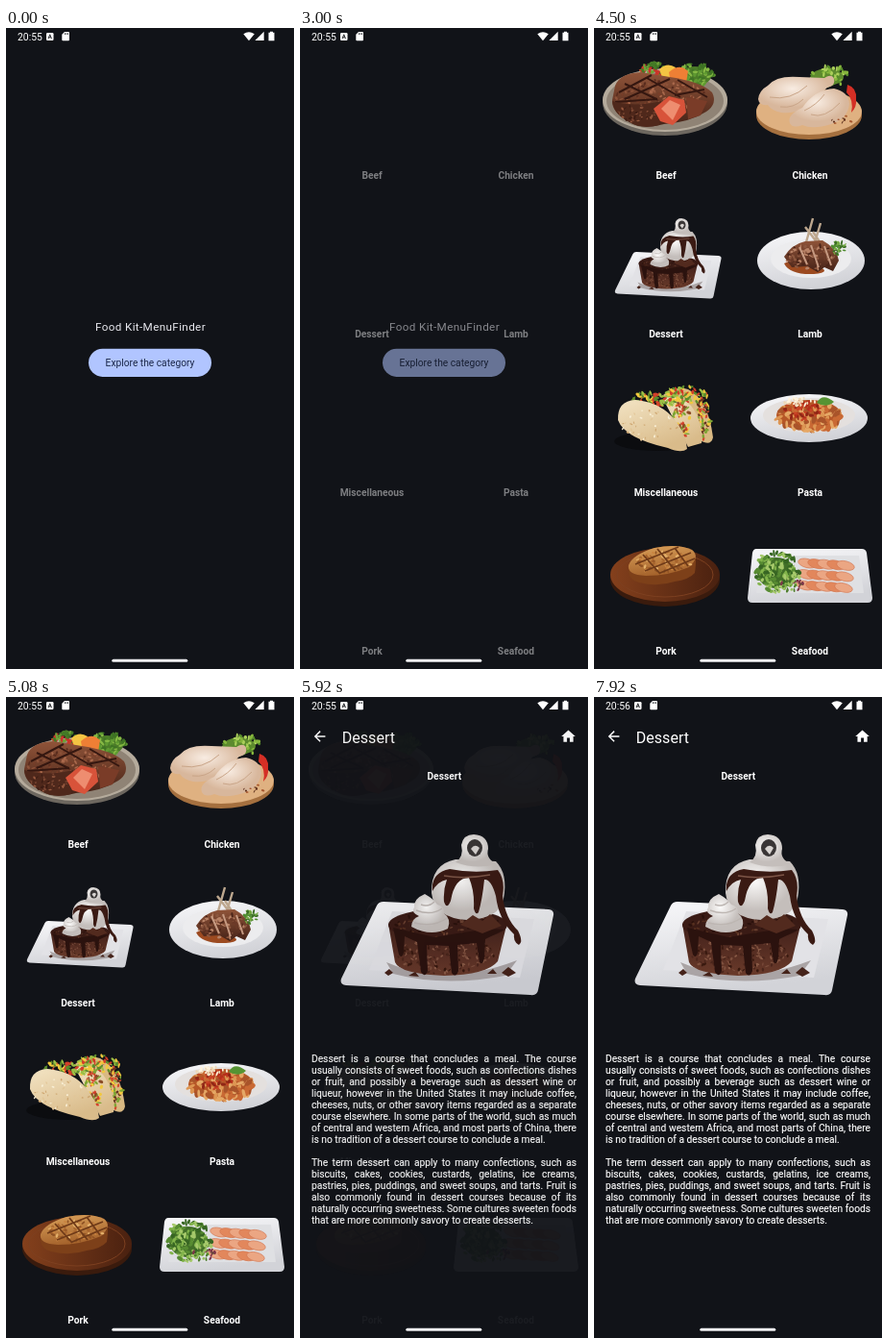
An HTML page for the animation above (8000 ms loop, 300x667 px).

```html
<!DOCTYPE html>
<html lang="en">
<head>
<meta charset="utf-8">
<title>Recipe browser</title>
<style>
  html, body { margin: 0; width: 100%; height: 100%; overflow: hidden; background: #111318; }
  body { position: relative; font-family: Roboto, sans-serif; color: #fff; }
  svg, .screen { position: absolute; left: 0; top: 0; width: 300px; height: 667px; }
  text { font: 10.22px Roboto, sans-serif; fill: #fff; }
  .mid { text-anchor: middle; }
  .bold { font-weight: 700; }
  .title { font-size: 11.68px; letter-spacing: .365px; fill: #e8e8ee; }
  .bar { font-size: 16.06px; }
  .clock { font-size: 10.4px; }
  .copy { position: absolute; left: 12px; top: 371px; width: 276px; font-size: 10.22px; line-height: 11.98px; -webkit-text-stroke: .15px #fff; }
  .copy p { margin: 0 0 11.98px; white-space: pre-line; text-align: justify; text-align-last: justify; }
  .copy span { display: block; white-space: nowrap; text-align-last: left; }

  .screen { animation: 8s cubic-bezier(.4, 0, .2, 1) infinite; }
  .home { animation-name: home; }
  .list { animation-name: list; }
  .detail { animation-name: detail; }
  .photos { animation: photos 8s step-end infinite; }
  .before { animation: before 8s step-end infinite; }
  .after { animation: after 8s step-end infinite; }
  @keyframes home { 0%, 34.6% { opacity: 1 } 43.35%, 100% { opacity: 0 } }
  @keyframes list { 0%, 34.6% { opacity: 0 } 43.35%, 67.5% { opacity: 1 } 76.25%, 100% { opacity: 0 } }
  @keyframes detail { 0%, 67.5% { opacity: 0 } 76.25%, 100% { opacity: 1 } }
  @keyframes photos { 0% { opacity: 0 } 44.75%, 100% { opacity: 1 } }
  @keyframes before { 0% { opacity: 1 } 88.75%, 100% { opacity: 0 } }
  @keyframes after { 0% { opacity: 0 } 88.75%, 100% { opacity: 1 } }
</style>
</head>
<body>

<svg width="300" height="667">
  <defs>
    <linearGradient id="china" x2=".3" y2="1"><stop stop-color="#f8f8fa"/><stop offset="1" stop-color="#d2d3d8"/></linearGradient>
    <linearGradient id="steak" y2="1" x2="0"><stop stop-color="#905439"/><stop offset="1" stop-color="#452217"/></linearGradient>
    <linearGradient id="chop" y2="1" x2=".3"><stop stop-color="#dca35c"/><stop offset="1" stop-color="#a5632c"/></linearGradient>
    <linearGradient id="wood" x2="1"><stop stop-color="#84401c"/><stop offset="1" stop-color="#4a2110"/></linearGradient>
    <linearGradient id="cake" y2="1" x2="0"><stop stop-color="#40201a"/><stop offset="1" stop-color="#6a3a2a"/></linearGradient>
    <radialGradient id="cream" cx=".4" cy=".35"><stop stop-color="#fcfbfa"/><stop offset="1" stop-color="#c4bebb"/></radialGradient>
    <radialGradient id="skin" cx=".45" cy=".35"><stop stop-color="#f8ece2"/><stop offset="1" stop-color="#d8b79c"/></radialGradient>
    <linearGradient id="shell" x2=".5" y2="1"><stop stop-color="#f3e4c4"/><stop offset="1" stop-color="#d9bb8a"/></linearGradient>

    <g id="dessert">
      <path d="M87 213L259 221Q265 222 264 227L248 305Q247 311 240 310L48 300Q41 299 43 293L80 217Q82 213 87 213Z" fill="url(#china)"/>
      <path d="M96 223L244 231L229 292L72 284Z" fill="#e2e2e6"/>
      <path d="M90 276Q150 303 226 274L214 290Q150 302 97 288Z" fill="#aaa4a5"/>
      <path d="M92 236L99 276Q104 288 150 290Q195 289 206 275L215 238Z" fill="url(#cake)"/>
      <g data-spray="152 268 50 20 190 2.4 #7d4f3d #4b261c #8a5b47 #38190f"/>
      <ellipse cx="154" cy="237" rx="62" ry="17" fill="#3a1b15"/>
      <g data-spray="154 237 56 13 70 2.5 #57301f #2a110c #6a4030"/>
      <path d="M137 204Q136 174 162 169L204 171Q217 184 212 210Q208 231 174 232Q140 230 137 204Z" fill="url(#cream)"/>
      <path d="M162 172Q171 166 168 154Q170 143 181 143Q196 144 196 158Q193 168 205 174Q183 180 162 172Z" fill="url(#cream)"/>
      <ellipse cx="182" cy="157" rx="8" ry="9" fill="#3a3636"/>
      <path d="M178 158Q182 152 187 157L183 164Z" fill="#d8d4d1"/>
      <path d="M138 202Q136 183 156 179Q181 184 206 180Q214 190 211 207Q214 231 227 243Q233 255 228 258Q222 255 223 247Q207 232 204 207Q199 189 192 190Q190 210 186 224Q183 228 181 220Q182 202 176 188Q161 188 157 212Q153 222 150 213Q149 201 153 190Q143 192 138 202Z" fill="#3a1a13"/>
      <path d="M97 240L103 268Q106 273 108 266L109 249L122 255L126 286Q130 293 133 285L132 258L155 259L158 287Q162 293 165 285L164 258L184 256L187 276Q191 280 192 270L193 252L213 242Q200 240 170 245L140 250Z" fill="#2b120e"/>
      <path d="M167 237L180 227L190 233L198 226L210 238L190 246Z" fill="#522a1e"/>
      <path d="M150 186Q172 190 198 185" fill="none" stroke="#7d5547" stroke-width="1.6"/>
      <path d="M116 239Q116 231 124 228Q115 224 119 219Q118 210 130 205Q139 210 143 216Q151 218 150 225Q158 231 154 241Q136 250 116 239Z" fill="url(#cream)"/>
      <path d="M121 222Q137 228 148 220M119 235Q140 240 153 230M126 216Q134 219 140 213" fill="none" stroke="#bdb6b2" stroke-width="1.5"/>
      <path d="M88 287L93 283L97 287L92 290ZM113 290L120 286L124 291ZM195 288L201 283L205 288ZM210 287L217 281L225 287L217 291Z" fill="#45231a"/>
    </g>
  </defs>
</svg>

<svg class="screen home">
  <text class="mid title" x="150.5" y="314.5">Food Kit-MenuFinder</text>
  <rect x="86" y="333.7" width="128" height="29.2" rx="14.6" fill="#b1c5ff"/>
  <text class="mid" x="150" y="352" style="fill:#1b2748">Explore the category</text>
</svg>

<svg class="screen list">
  <g class="photos">
    <g id="beef">
      <ellipse cx="74" cy="78" rx="65" ry="34" fill="#6d675f"/>
      <ellipse cx="74" cy="75" rx="65" ry="33" fill="#b5ab9c"/>
      <ellipse cx="74" cy="76" rx="61" ry="30" fill="#8f8375"/>
      <ellipse cx="105" cy="50" rx="17" ry="10" fill="#4c7c29"/>
      <g data-spray="105 49 19 12 65 3.6 #5f9a32 #86b944 #3f7424"/>
      <g data-spray="62 43 13 7 30 3.8 #6fa338 #c9352a #447a26"/>
      <path d="M68 43Q76 35 85 41L82 52L72 54Z" fill="#f4c443"/>
      <path d="M78 46Q89 36 98 45L96 57L80 58Z" fill="#ee7f35"/>
      <path d="M22 60Q27 47 49 46L79 51Q112 56 123 67Q129 79 117 87Q100 98 73 100Q50 106 37 98Q18 88 19 75Z" fill="url(#steak)"/>
      <g data-spray="70 74 48 20 150 2.4 #a9684b #793e29 #5a2c1e #8c5138"/>
      <path d="M26 67L60 49M32 74L79 53M22 77L66 74M84 70L115 64M32 58L65 74M55 52L90 72M87 54L118 72" stroke="#351710" stroke-width="2"/>
      <path d="M19 76Q42 83 70 76L68 101Q50 106 37 98Q20 89 19 76Z" fill="#4f281b"/>
      <g data-spray="44 89 20 9 40 2 #7a4632 #97593f #3c1c13"/>
      <path d="M62 84L78 71L94 75L96 88L82 101L69 97Z" fill="#d8533a"/>
      <path d="M96 72L118 76L111 91L98 95Z" fill="#7a3c28"/>
      <path d="M70 84L79 75L90 80L82 96Z" fill="#ee8d70"/>
    </g>

    <g id="chicken">
      <ellipse cx="224" cy="91" rx="55" ry="25" fill="#a5703f"/>
      <ellipse cx="224" cy="87" rx="55" ry="24" fill="#dfb181"/>
      <ellipse cx="243" cy="51" rx="17" ry="9" fill="#5d8a2e"/>
      <g data-spray="244 50 20 11 65 3.4 #86b63d #568b2a #abd05b"/>
      <path d="M264 59Q274 62 273 74Q274 82 268 88Q271 75 263 67Z" fill="#d42f25"/>
      <path d="M171 74Q172 65 181 60Q190 49 214 51L240 52Q248 47 250 53Q252 60 243 62L230 74Q217 90 195 88Q185 86 181 80Q172 81 171 74Z" fill="url(#skin)"/>
      <path d="M204 99Q201 90 217 83Q230 64 250 63Q265 66 266 79Q264 95 247 100Q228 106 217 101Q207 105 204 99Z" fill="url(#skin)"/>
      <path d="M183 72Q205 76 222 60M194 82Q208 84 218 74M226 90Q240 95 256 78M219 86Q232 80 240 69" stroke="#c9a588" fill="none"/>
      <g data-spray="258 95 11 6 10 2 #5b2f1d #a4542c"/>
    </g>

    <use href="#dessert" transform="translate(.5 126.5) scale(.5)"/>

    <g id="lamb">
      <ellipse cx="226" cy="242" rx="56" ry="30" fill="url(#china)"/>
      <ellipse cx="226" cy="240" rx="42" ry="20" fill="#ececee"/>
      <path d="M198 245Q210 238 231 247Q250 254 229 256Q204 257 198 245Z" fill="#9c4a20"/>
      <path d="M236 228L220 207M219 230L228 198M228 230L236 203M240 230L228 212" stroke="#bda78e" stroke-width="2.4"/>
      <path d="M198 238Q206 225 220 222L238 221Q253 229 255 242L249 253L240 249L233 254L222 248L206 249Z" fill="url(#steak)"/>
      <g data-spray="226 238 26 13 90 2.8 #b88266 #6b3a28 #8c573f #4b2519"/>
      <path d="M214 228L222 246M226 226L234 249M240 227L247 247" stroke="#c69a82" stroke-width="2"/>
      <g data-spray="255 229 7 7 30 2.8 #4f8c31 #76ab44 #3c6c27"/>
    </g>

    <g id="tacos">
      <ellipse cx="66" cy="430" rx="45" ry="10" fill="#0b0c0f"/>
      <path d="M72 382Q84 372 98 376Q119 386 124 426Q122 435 112 430Z" fill="#d9b983"/>
      <g data-spray="96 382 22 9 70 3.2 #9cbf45 #f1c83e #cf3d28 #5d8c2c"/>
      <g data-spray="114 406 7 22 55 3 #65351f #f1c83e #7da534 #d24b2e"/>
      <path d="M72 386Q88 380 101 393Q114 410 112 432L98 436Z" fill="url(#shell)"/>
      <g data-spray="65 386 24 8 75 3.2 #9cbf45 #f1c83e #d3402a #5d8c2c"/>
      <g data-spray="91 408 9 22 65 3 #8b4c27 #f1c83e #7da534 #d3402a"/>
      <path d="M25 408Q24 388 43 387Q66 389 80 403Q96 420 97 438Q91 443 77 437Q32 427 25 408Z" fill="url(#shell)"/>
      <g data-spray="58 413 29 17 40 1.8 #cfa873 #e2c698 #f9efd6"/>
    </g>

    <g id="pasta">
      <ellipse cx="224" cy="406" rx="61" ry="25" fill="url(#china)"/>
      <ellipse cx="224" cy="403" rx="48" ry="18" fill="#e4e0de"/>
      <ellipse cx="224" cy="403" rx="34" ry="16" fill="#b65727"/>
      <g data-spray="224 404 34 15 90 5.5 #dd9653 #c96934 #a9542a #e5a866"/>
      <g data-spray="217 398 20 10 60 3.2 #b72f1c #c94526 #912616"/>
      <g data-spray="214 389 16 4 34 2.6 #fff3dd #efd9b6"/>
      <path d="M232 390Q238 379 250 389Q242 396 232 390Z" fill="#569333"/>
    </g>

    <g id="pork">
      <ellipse cx="74" cy="574" rx="57" ry="28" fill="#3a1b0d"/>
      <ellipse cx="74" cy="569" rx="57" ry="28" fill="url(#wood)"/>
      <ellipse cx="74" cy="569" rx="50" ry="23" fill="none" stroke="#7d4020"/>
      <path d="M36 562Q37 549 63 541Q87 536 102 543Q108 548 105 567Q99 574 84 576Q66 582 47 577Q35 574 36 562Z" fill="#7d4019"/>
      <path d="M36 559Q40 548 63 541Q87 536 102 543Q111 550 99 561Q78 570 54 570Q34 569 36 559Z" fill="url(#chop)"/>
      <g data-spray="70 556 31 12 80 2.6 #e4b06a #a7642d #c98440 #8f5224"/>
      <path d="M43 558L88 540M53 565L101 546M69 567L105 552M51 548L69 568M66 542L85 565M84 541L98 560" stroke="#6f3a18" stroke-width="1.8"/>
    </g>

    <g id="seafood">
      <path d="M169 542H279Q283 542 284 546L290 593Q290 598 285 598H165Q160 598 160 593L165 546Q166 542 169 542Z" fill="url(#china)"/>
      <path d="M174 549H276L281 588H169Z" fill="#dfe0e3"/>
      <g id="salmon"></g>
      <ellipse cx="190" cy="567" rx="20" ry="16" fill="#426f28"/>
      <g data-spray="190 566 24 21 120 4 #578b32 #82b44b #376623 #a6c96b"/>
      <g data-spray="206 579 12 8 26 3 #4f7d2e #7c3548 #98bf5c"/>
    </g>
  </g>
  <g id="labels"></g>
</svg>

<div class="screen detail">
  <svg>
    <path d="M20 11H7.83l5.59-5.59L12 4l-8 8 8 8 1.41-1.41L7.83 13H20z" transform="translate(11.8 32.2) scale(.73)" fill="#fff"/>
    <path d="M10 20v-6h4v6h5v-8h3L12 3 2 12h3v8z" transform="translate(270.8 32.2) scale(.73)" fill="#fff"/>
    <text class="bar" x="43.8" y="48">Dessert</text>
    <text class="mid bold" x="150.3" y="85.5">Dessert</text>
    <use href="#dessert"/>
  </svg>
  <div class="copy">
    <p>Dessert is a course that concludes a meal. The course
usually consists of sweet foods, such as confections dishes
or fruit, and possibly a beverage such as dessert wine or
liqueur, however in the United States it may include coffee,
cheeses, nuts, or other savory items regarded as a separate
course elsewhere. In some parts of the world, such as much
of central and western Africa, and most parts of China, there
<span>is no tradition of a dessert course to conclude a meal.</span></p>
    <p>The term dessert can apply to many confections, such as
biscuits, cakes, cookies, custards, gelatins, ice creams,
pastries, pies, puddings, and sweet soups, and tarts. Fruit is
also commonly found in dessert courses because of its
naturally occurring sweetness. Some cultures sweeten foods
<span>that are more commonly savory to create desserts.</span></p>
  </div>
</div>

<svg fill="#fff">
  <text class="clock before" x="12" y="12.5">20:55</text>
  <text class="clock after" x="12" y="12.5">20:56</text>
  <rect x="42" y="5" width="7.5" height="8" rx="1.2"/>
  <path d="M44 11.2L45.75 6.8L47.5 11.2M44.7 9.8H46.8" fill="none" stroke="#111318" stroke-width=".9"/>
  <path d="M61 4H65Q66 4 66 5V12.2Q66 13.2 65 13.2H59.3Q58.3 13.2 58.3 12.2V6.8Z"/>
  <path d="M61.4 5.2V7M63 5.2V7M64.6 5.2V7" stroke="#111318" stroke-width=".7"/>
  <path d="M247.3 6.3Q253 2 258.8 6.3L253 13.2Z"/>
  <path d="M268.7 3.8V13H259.4Z"/>
  <path d="M275 3.8H278V4.8H279.5V13.2H273.5V4.8H275Z"/>
  <rect x="110.3" y="656.8" width="79" height="3" rx="1.5" fill="#f0f0f2"/>
</svg>

<script>
  const NS = 'http://www.w3.org/2000/svg';
  const add = (parent, tag, attrs) => {
    const node = parent.appendChild(document.createElementNS(NS, tag));
    for (const key in attrs) node.setAttribute(key, attrs[key]);
    return node;
  };

  let seed = 7;
  const random = () => (seed = seed * 16807 % 2147483647) / 2147483647;

  // Fills an ellipse with small tilted flecks: cx cy rx ry count size colours...
  for (const group of document.querySelectorAll('[data-spray]')) {
    const [cx, cy, rx, ry, count, size, ...colors] = group.dataset.spray.split(' ');
    for (let i = 0; i < count; i++) {
      const angle = random() * 2 * Math.PI;
      const reach = Math.sqrt(random());
      const x = +cx + rx * reach * Math.cos(angle);
      const y = +cy + ry * reach * Math.sin(angle);
      add(group, 'ellipse', {
        rx: size * (.5 + random() * .5), ry: size * (.25 + random() * .3),
        fill: colors[i % colors.length],
        transform: `translate(${x} ${y}) rotate(${random() * 180})`
      });
    }
  }

  // Three rows of overlapping slanted slices.
  const salmon = document.getElementById('salmon');
  for (let row = 0; row < 3; row++) {
    for (let col = 0; col < 5; col++) {
      const x = 222 + col * 10 - row;
      const y = 557 + row * 11.5 + col * .6;
      add(salmon, 'ellipse', {
        rx: 9.5, ry: 4.6, transform: `translate(${x} ${y}) rotate(14)`,
        fill: col % 2 ? '#e2875c' : '#eba683', stroke: '#d27650', 'stroke-width': .6
      });
    }
  }

  const names = ['Beef', 'Chicken', 'Dessert', 'Lamb', 'Miscellaneous', 'Pasta', 'Pork', 'Seafood'];
  const labels = document.getElementById('labels');
  names.forEach((name, i) => {
    add(labels, 'text', { class: 'mid bold', x: 75 + i % 2 * 150, y: 156.8 + (i >> 1) * 165 }).textContent = name;
  });
</script>
</body>
</html>
```
